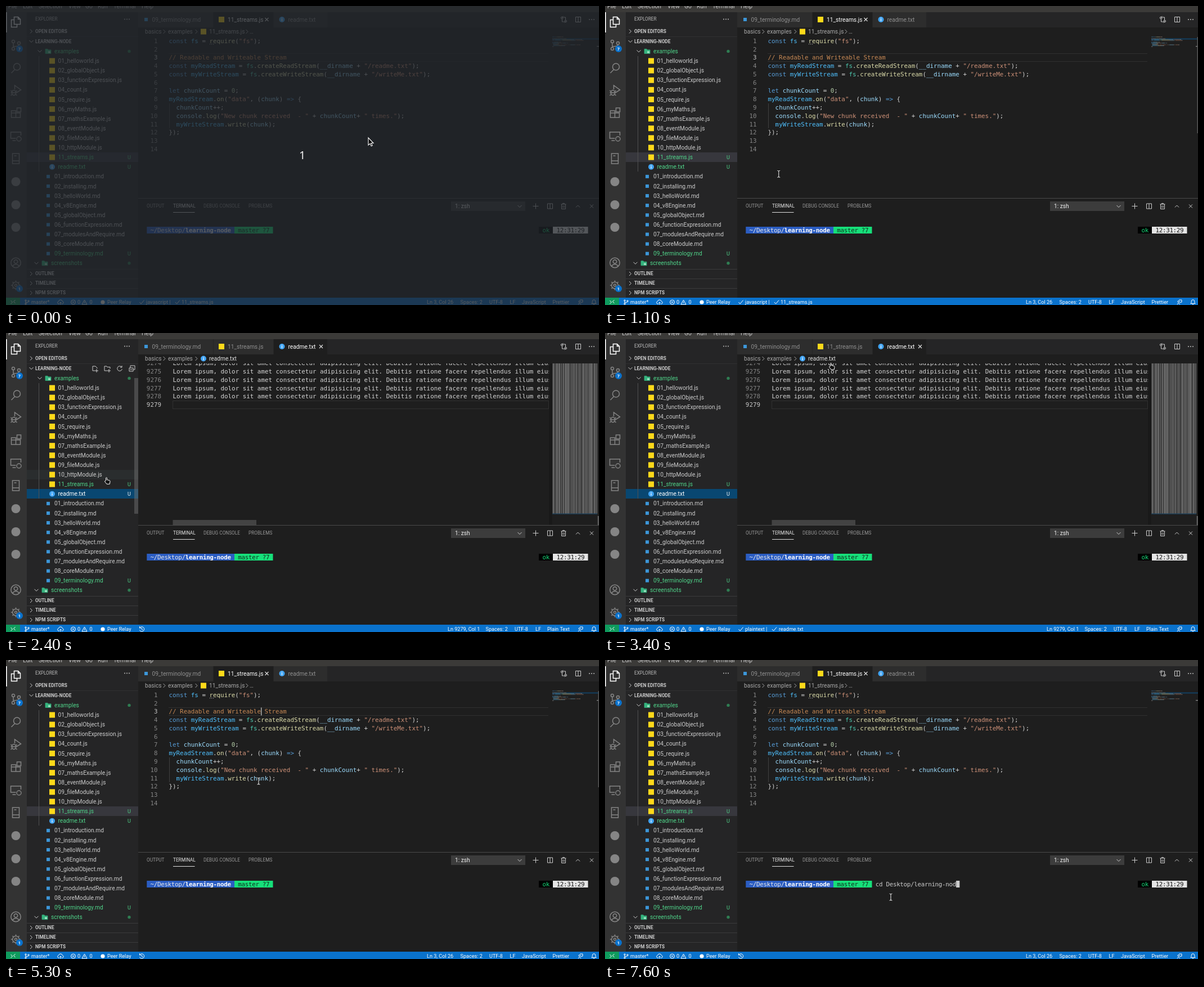
Animation, 1054 px wide and 531 px high, one loop 8000 ms. Source, as an HTML page with a canvas:

```html
<!DOCTYPE html>
<html lang="en">
<head>
<meta charset="utf-8">
<title>Code editor</title>
<style>
html, body { margin: 0; width: 100%; height: 100%; overflow: hidden; background: #1e1e1e; }
canvas { display: block; }
</style>
</head>
<body>
<canvas id="stage" width="1054" height="531"></canvas>
<script>
const g = document.getElementById('stage').getContext('2d');
const UI = 'Roboto, sans-serif', MONO = '"DejaVu Sans Mono", monospace';
const GREEN = '#50d58a', GREY = '#858585', TEXT = '#cccccc', BLUE = '#0a72cc', YELLOW = '#ffd91a';
const COL = 6.545, LINE = 14.78, ROW = 17.11, CELL = 6.23;

const INK = { b: '#569cd6', c: '#4fc1ff', v: '#9cdcfe', f: '#dcdcaa', s: '#ce9178',
  t: '#4ec9b0', n: '#b5cea8', o: '#c98a55', w: '#d4d4d4' };
const CODE = [
  '~bconst ~cfs~w = ~frequire~w(~s"fs"~w);',
  '',
  '~o// Readable and Writeable Stream',
  '~bconst ~cmyReadStream~w = ~tfs~w.~fcreateReadStream~w(~v__dirname~w + ~s"/readme.txt"~w);',
  '~bconst ~cmyWriteStream~w = ~tfs~w.~fcreateWriteStream~w(~v__dirname~w + ~s"/writeMe.txt"~w);',
  '',
  '~blet ~vchunkCount~w = ~n0~w;',
  '~cmyReadStream~w.~fon~w(~s"data"~w, (~vchunk~w) ~b=>~w {',
  '~w  ~vchunkCount~w++;',
  '~w  ~vconsole~w.~flog~w(~s"New chunk received  - "~w + ~vchunkCount~w+ ~s" times."~w);',
  '~w  ~cmyWriteStream~w.~fwrite~w(~vchunk~w);',
  '~w});',
  '', ''
].map(line => {
  const parts = line.split(/~(.)/).slice(1), tokens = [];
  for (let i = 0, col = 0; i < parts.length; col += parts[i + 1].length, i += 2)
    tokens.push({ ink: INK[parts[i]], text: parts[i + 1], col });
  return tokens;
});
const LOREM = 'Lorem ipsum, dolor sit amet consectetur adipisicing elit. Debitis ratione facere repellendus illum eius';
const FILES = ('examples 01_helloworld.js 02_globalObject.js 03_functionExpression.js 04_count.js 05_require.js ' +
  '06_myMaths.js 07_mathsExample.js 08_eventModule.js 09_fileModule.js 10_httpModule.js 11_streams.js readme.txt ' +
  '01_introduction.md 02_installing.md 03_helloWorld.md 04_v8Engine.md 05_globalObject.md 06_functionExpression.md ' +
  '07_modulesAndRequire.md 08_coreModule.md 09_terminology.md screenshots').split(' ');

// Pointer stops: time, x, y
const PATH = [[0, 639, 231], [100, 639, 231], [700, 370, 300], [1000, 370, 300], [1400, 125, 293], [2200, 125, 293],
  [3000, 345, 170], [3400, 403, 59], [3800, 408, 29], [4300, 408, 29], [5000, 449, 215],
  [5300, 449, 215], [5400, 531, 330], [5600, 508, 421], [8000, 508, 421]];

const rect = (x, y, w, h, color) => { g.fillStyle = color; g.fillRect(x, y, w, h); };
const dot = (x, y, r, color) => { g.fillStyle = color; g.beginPath(); g.arc(x, y, r, 0, 7); g.fill(); };
function text(s, x, y, color = TEXT, size = 10.2, weight = 400, align = 'left', family = UI) {
  g.font = `${weight} ${size}px ${family}`;
  g.textAlign = align;
  g.fillStyle = color;
  g.fillText(s, x, y + size * .35);
}
const mono = (s, x, y, color, align) => text(s, x, y, color, 10.87, 400, align, MONO);
function term(s, x, y, color, weight) {
  g.letterSpacing = '-0.314px';
  text(s, x, y, color, 10.87, weight, 'left', MONO);
  g.letterSpacing = '0px';
}
function icon(d, x, y, color = TEXT, width = 1, fill) {
  const path = new Path2D(d);
  g.save();
  g.translate(x, y);
  if (fill) { g.fillStyle = fill; g.fill(path); }
  g.strokeStyle = color;
  g.lineWidth = width;
  g.stroke(path);
  g.restore();
}
const RIGHT = 'M-2-3.5 1.5 0-2 3.5', DOWN = 'M-3.5-2 0 1.5 3.5-2', UP = 'M-3.5 2 0-1.5 3.5 2';
const CROSS = 'M-3-3 3 3M3-3-3 3', CHECK = 'M-4 0-1.5 3 4-3.5', SPLIT = 'M-4.5-4.5h9v9h-9zM0-4.5v9';
const ring = r => `M${-r} 0a${r} ${r} 0 1 0 ${2 * r} 0a${r} ${r} 0 1 0 ${-2 * r} 0`;
const dots = (x, y) => [-4, 0, 4].forEach(d => dot(x + d, y, .9, TEXT));

function fileIcon(name, x, y) {
  if (name.endsWith('.js')) rect(x - 5, y - 5, 10, 10, YELLOW);
  else if (name.endsWith('.md')) rect(x - 3, y - 3, 6, 6, '#3c96d8');
  else {
    dot(x, y, 5, '#42a5f5');
    rect(x - .6, y - 1, 1.2, 3.8, '#fff');
    rect(x - .6, y - 3, 1.2, 1.2, '#fff');
  }
}

function activityBar() {
  rect(0, 11, 37, 507, '#333333');
  rect(0, 11, 1.6, 36, '#fff');
  const at = (d, y, color = GREY) => icon(d, 17.5, y, color, 1.5);
  at('M-3-9h7l4 4v9h-11zM4-9v4h4M-3-4h-5v13h10v-5', 28.5, '#fff');
  at('M-7-6a2.5 2.5 0 1 0 5 0a2.5 2.5 0 1 0-5 0M3-3a2.5 2.5 0 1 0 5 0a2.5 2.5 0 1 0-5 0M-7 7a2.5 2.5 0 1 0 5 0a2.5 2.5 0 1 0-5 0M-4.5-3.5v8M5.5-.5q0 4-10 3', 69);
  at('M-4-2a6 6 0 1 0 12 0a6 6 0 1 0-12 0M-2 3-8 9', 110);
  at('M-2-2v-7L9-1 1 4M-7 4a3.5 4.5 0 1 0 7 0a3.5 4.5 0 1 0-7 0M-9 0l2 2M2 0l-2 2M-9 9l2-2M2 9l-2-2M-9 4h11', 150);
  at('M-8-4h8v12h-8zM0 0h8v8h-16V0zM2-9h7v7h-7z', 190);
  at('M9-1v-6H-9V4H0M-6 8h6', 231);
  icon(ring(4), 23, 236, GREY, 1.4);
  at('M-6-9h12v18h-12zM-6 4h12M-3-5h4', 271);
  for (const y of [312, 353, 393]) dot(17.5, y, 8, GREY);
  at(ring(8.7), 456);
  at(ring(3.2), 454);
  at('M-6 6q6-7 12 0', 456);
  at(ring(5.8), 496);
  at(ring(2), 496);
  for (let a = 0; a < 8; a++) {
    const c = Math.cos(a * Math.PI / 4), s = Math.sin(a * Math.PI / 4);
    at(`M${c * 6} ${s * 6}L${c * 8.6} ${s * 8.6}`, 496);
  }
  for (const [s, y] of [['7', 76], ['1', 502]]) {
    dot(24, y, 6, BLUE);
    text(s, 24, y, '#fff', 7.5, 700, 'center');
  }
}

function sidebar(t, mouse, readme) {
  rect(37, 11, 198, 507, '#252526');
  text('EXPLORER', 52, 23.5, '#bbb', 8.2);
  dots(215, 23.5);
  const inside = mouse.x < 235;
  const hover = inside ? Math.round((mouse.y - 6 - 80.4) / ROW) : -1;
  const selected = readme ? 12 : 11;
  FILES.forEach((name, i) => {
    const y = 80.4 + i * ROW, folder = !name.includes('.');
    const focused = i === selected && t >= 1800 && t < 4200;
    const fill = focused ? '#094771' : i === selected ? '#37373d' : i === hover ? '#2a2d2e' : '';
    if (fill) rect(37, Math.round(y - 8.5), 198, 17, fill);
    const changed = folder || i === 11 || i === 12 || i === 21;
    const color = focused ? '#fff' : changed ? GREEN : TEXT;
    if (folder) {
      const x = i ? 54 : 60;
      icon(DOWN, x, y, TEXT);
      icon('M-5-4h4l1 1.5h5v6.5h-10z', x + 15, y, '#35b37e', .8, '#35b37e');
      rect(x + 15, y, 4, 3, '#a5e3c4');
      dot(219, y, 2.7, '#2f7d52');
    } else {
      fileIcon(name, i < 13 ? 82 : 75, y);
      if (changed) text('U', 219, y, color, 9, 400, 'center');
    }
    text(name, folder ? (i ? 80 : 86) : i < 13 ? 92.5 : 86, y, color);
  });
  rect(58, 89, 1, 205, '#505050');
  if (t >= 1200 && t < 3100) rect(228, 80, 7, 241, 'rgba(121,121,121,.45)');

  for (const [name, y, d] of [['OPEN EDITORS', 45, RIGHT], ['LEARNING-NODE', 63, DOWN],
    ['OUTLINE', 475.5, RIGHT], ['TIMELINE', 492.5, RIGHT], ['NPM SCRIPTS', 509.5, RIGHT]]) {
    if (y > 60) rect(37, Math.round(y - 9), 198, 1, y > 80 ? '#3b3b3c' : '#303031');
    icon(d, 45, y);
    text(name, 52, y, TEXT, 8.25, 700);
  }
  if (inside) {
    icon('M0 4h-4v-8h5l3 3v1M3 1v6M0 4h6', 158, 63);
    icon('M0 4h-5v-8h4l1 1.5h5v3M3 1v6M0 4h6', 180, 63);
    icon('M3.5-2.5a4.3 4.3 0 1 0 .8 3.5M4-5v3H1', 202, 63);
    icon('M-5-1h7v6h-7zM-3-1v-4h8v7h-3M-3.5 2h4', 224, 63);
  }
}

function tabs(readme) {
  rect(235, 11, 819, 27, '#252526');
  const list = [['09_terminology.md', 235, 369, 249, 259.5], ['11_streams.js', 369, 476, 383, 394], ['readme.txt', 476, 572, 490.5, 501.5]];
  list.forEach(([name, x0, x1, ix, tx], i) => {
    const active = i === (readme ? 2 : 1);
    rect(x0, 11, x1 - x0 - 1, 27, active ? '#1e1e1e' : '#2d2d2d');
    fileIcon(name, ix, 24);
    text(name, tx, 24, active ? '#fff' : '#8f8f8f');
    if (active) icon(CROSS, i === 1 ? 463.5 : 560, 24, '#ddd', 1.2);
  });
  icon(ring(1.6), 988, 21);
  icon(ring(1.6), 995, 27);
  icon('M-3-1v5h4M1 2l2 2-2 2M3 1v-5h-4M-1-6l-2 2 2 2', 991.5, 24);
  icon(SPLIT, 1017, 24);
  dots(1041, 24);

  const crumb = '#a9a9a9';
  text('basics', 247, 45.5, crumb);
  icon(RIGHT, 281.5, 45.5, crumb);
  text('examples', 288, 45.5, crumb);
  icon(RIGHT, 338.5, 45.5, crumb);
  fileIcon(readme ? 'readme.txt' : '11_streams.js', 351, 45.5);
  text(readme ? 'readme.txt' : '11_streams.js', 361, 45.5, readme ? '#e0e0e0' : crumb);
  if (!readme) {
    icon(RIGHT, 428.5, 45.5, crumb);
    text('…', 433, 45.5, crumb);
  }
}

function codeView(t) {
  rect(289, 84, 675, 1, '#303030');
  rect(289, 98, 675, 1, '#303030');
  rect(290, 173, 1, 44, '#404040');
  rect(971, 57.5, 83, 2, '#123f60');
  CODE.forEach((tokens, i) => {
    const y = 62 + i * LINE;
    mono(i + 1, 269.5, y, i === 2 ? '#c6c6c6' : GREY, 'right');
    for (const { ink, text: s, col } of tokens) {
      mono(s, 289.5 + col * COL, y, ink);
      g.globalAlpha = .5;
      [...s].forEach((c, k) => c !== ' ' && rect(971 + (col + k) * .78, 54.4 + i * 1.56, .78, 1, ink));
      g.globalAlpha = 1;
    }
  });
  for (const d of [0, 3, 6]) rect(362 + d, 67, 1.2, 1.2, '#aaa');
  rect(1050, 71, 4, 1.3, '#8a8a8a');
  if ((t >= 100 && t < 1200) || (t >= 4500 && t < 6000)) rect(1052.5, 55, 1.5, 171, '#555');
  if (t >= 4800 && t < 5500) rect(453, 84.5, 1.5, 14, '#aeafad');
}

function readmeView(t) {
  g.save();
  g.beginPath();
  g.rect(235, 54, 730, 287);
  g.clip();
  for (let i = 0; i < 6; i++) {
    const y = 53.5 + i * LINE;
    mono(9274 + i, 276, y, i === 5 ? '#c6c6c6' : GREY, 'right');
    if (i < 5) mono(LOREM, 296.5, y, INK.w);
  }
  g.restore();
  g.strokeStyle = '#303030';
  g.lineWidth = 1;
  g.strokeRect(296.5, 120.5, 668, 14);
  rect(965, 54, 6, 287, '#191919');
  [...LOREM].slice(0, 102).forEach((c, i) => {
    const shade = c === ' ' ? 32 : 84 + c.charCodeAt(0) * 7 % 52;
    rect(971.5 + i * .78, 54, .79, 267, `rgb(${shade},${shade},${shade})`);
  });
  rect(971, 320.5, 80, 1.5, '#1b3c55');
  rect(1051.5, 325, 2.5, 16, '#5a5a5a');
  if (t < 3800) rect(296.5, 332, 148.5, 9, '#434343');
}

function panel(t) {
  rect(235, 341, 819, 1, '#4a4a4a');
  for (const [s, x] of [['OUTPUT', 250], ['TERMINAL', 297], ['DEBUG CONSOLE', 351], ['PROBLEMS', 431]])
    text(s, x, 355.5, x === 297 ? '#e7e7e7' : '#979797', 8.25);
  rect(297, 366, 38.5, 1, '#e0e0e0');
  rect(791, 347, 132, 17, '#3c3c3c');
  text('1: zsh', 798, 355.5, '#f0f0f0');
  icon(DOWN, 913, 356);
  icon('M-5 0h10M0-5v10', 941.5, 355.5);
  icon(SPLIT, 967, 355.5);
  icon('M-4.5-3.5h9M-1.5-3.5v-1.5h3v1.5M-3.5-3.5v8.5h7v-8.5M-1.2-1v4M1.2-1v4', 991, 355.5);
  icon(UP, 1016.5, 355.5);
  icon(CROSS, 1041, 355.5);

  const y = 397.7, block = (x, w, color) => rect(x, 392, w, 12, color);
  block(250.3, 155.7, '#2b5dc2');
  term('~/Desktop/', 256.5, y, '#e8e8e8');
  term('learning-node', 318.8, y, '#fff', 700);
  block(406, 68.5, '#16e07a');
  term('master ?7', 412.3, y, '#10301f');
  block(947, 25, '#000');
  term('ok', 953.5, y, '#16d878');
  block(972, 62.5, '#e5e5e5');
  term('12:31:29', 978.5, y, '#111');

  const full = 'cd Desktop/learning-node';
  const typed = t < 6500 ? '' : t < 7000 ? 'c.' : t < 7600 ? full : full.slice(0, -1);
  term(typed, 480.8, y, TEXT);
  if (t >= 5600) block(480.8 + typed.length * CELL, CELL, '#cccccc');
}

function statusBar(t, readme) {
  const y = 526, say = (s, x) => text(s, x, y, '#fff', 9.1);
  const sign = (d, x, dy = 0) => icon(d, x, y + dy, '#fff');
  rect(0, 518, 1054, 13, BLUE);
  rect(0, 518, 25, 13, '#0f9b5e');
  sign('M-4-3-1 0-4 3M4-4 1-1 4 2', 12.5);
  sign('M-2-2v4M3-1q0 2-5 2', 37);
  for (const [dx, dy] of [[-2, -3], [3, -2], [-2, 3]]) sign(ring(1.2), 37 + dx, dy);
  say('master*', 45);
  sign('M-2 3h-1.5a2.3 2.3 0 0 1 0-4.5a3.5 3.5 0 0 1 6.8 0a2.3 2.3 0 0 1 0 4.5h-1M0 4.5v-4.5M-1.6 1.5 0 0 1.6 1.5', 97);
  sign(ring(4), 119.5);
  sign('M-1.6-1.6 1.6 1.6M1.6-1.6-1.6 1.6', 119.5);
  say('0', 127);
  sign('M0-4 4.5 4h-9zM0-1v2.5', 139.5);
  say('0', 148.5);
  dot(172, y, 3.6, '#fff');
  say('Peer Relay', 180);
  if ((t >= 2200 && t < 3100) || t >= 4200) {
    sign('M-3.5-2.5a4.2 4.2 0 1 1-.5 4M-4-5v3h3M0-2v2.5l2 1', 241.5);
  } else {
    sign(CHECK, 241.5);
    say((readme ? 'plaintext' : 'javascript') + ' |', 249);
    sign(CHECK, readme ? 301 : 305);
    say(readme ? 'readme.txt' : '11_streams.js', readme ? 309 : 312);
  }
  const info = readme
    ? [['Ln 9279, Col 1', 785], ['Spaces: 2', 852.5], ['UTF-8', 904], ['LF', 941], ['Plain Text', 962]]
    : [['Ln 3, Col 26', 748], ['Spaces: 2', 807.5], ['UTF-8', 859], ['LF', 895.5], ['JavaScript', 917], ['Prettier', 971.5]];
  info.forEach(([s, x]) => say(s, x));
  sign('M-1-4h5v4h-2l-1.5 1.5M-4 4q2-4 5 0', 1021);
  sign(ring(1.5), 1019.5, -1);
  sign('M-4 2.5h8l-1.2-2v-2a2.8 2.8 0 0 0-5.6 0v2zM-1 4h2', 1045);
}

function pointer(t, { x, y }) {
  if (t < 100) icon('M0 0v13l3-2.7 2.2 4.5 2-1-2.2-4.3h4z', 644, 234, '#fff', 1.1, '#000');
  else if (x < 235 || y < 62)
    icon('M-2.5 0v-5q1-1.5 2 0v3.5l4.5 1q1.2.5 1 2l-.8 4.5h-5.2l-3.5-4.5q0-1.5 1.2-1z', x, y, '#fff', 1, '#111');
  else {
    const beam = 'M-2.5-6q2 0 2.5 1.2q.5-1.2 2.5-1.2M0-5v10M-2.5 6q2 0 2.5-1.2q.5 1.2 2.5 1.2';
    icon(beam, x, y, '#111', 2.4);
    icon(beam, x, y, '#eee', 1.1);
  }
}

function mouseAt(t) {
  const i = PATH.findIndex(p => p[0] > t), [t0, x0, y0] = PATH[i - 1], [t1, x1, y1] = PATH[i];
  const k = (t - t0) / (t1 - t0);
  return { x: x0 + (x1 - x0) * k, y: y0 + (y1 - y0) * k };
}

function draw() {
  const t = Math.floor(performance.now() % 8000 / 100) * 100;
  const mouse = mouseAt(t), readme = t >= 1900 && t < 4200, loaded = readme && t >= 2200;
  rect(0, 0, 1054, 531, '#1e1e1e');
  if (loaded) readmeView(t);
  else if (!readme) codeView(t);
  tabs(readme);
  rect(0, 0, 1054, 11, '#3b3a38');
  for (const [s, x] of [['File', 4], ['Edit', 30], ['Selection', 58], ['View', 111], ['Go', 141], ['Run', 163], ['Terminal', 191], ['Help', 241]])
    text(s, x, .3, TEXT);
  activityBar();
  sidebar(t, mouse, readme);
  panel(t);
  statusBar(t, loaded);
  if (t < 100) {
    rect(0, 0, 1054, 531, 'rgba(33,37,43,.74)');
    text('1', 526.7, 265, '#f0f0f0', 20, 400, 'center', '"Noto Sans", sans-serif');
  }
  pointer(t, mouse);
  requestAnimationFrame(draw);
}
draw();
</script>
</body>
</html>
```
